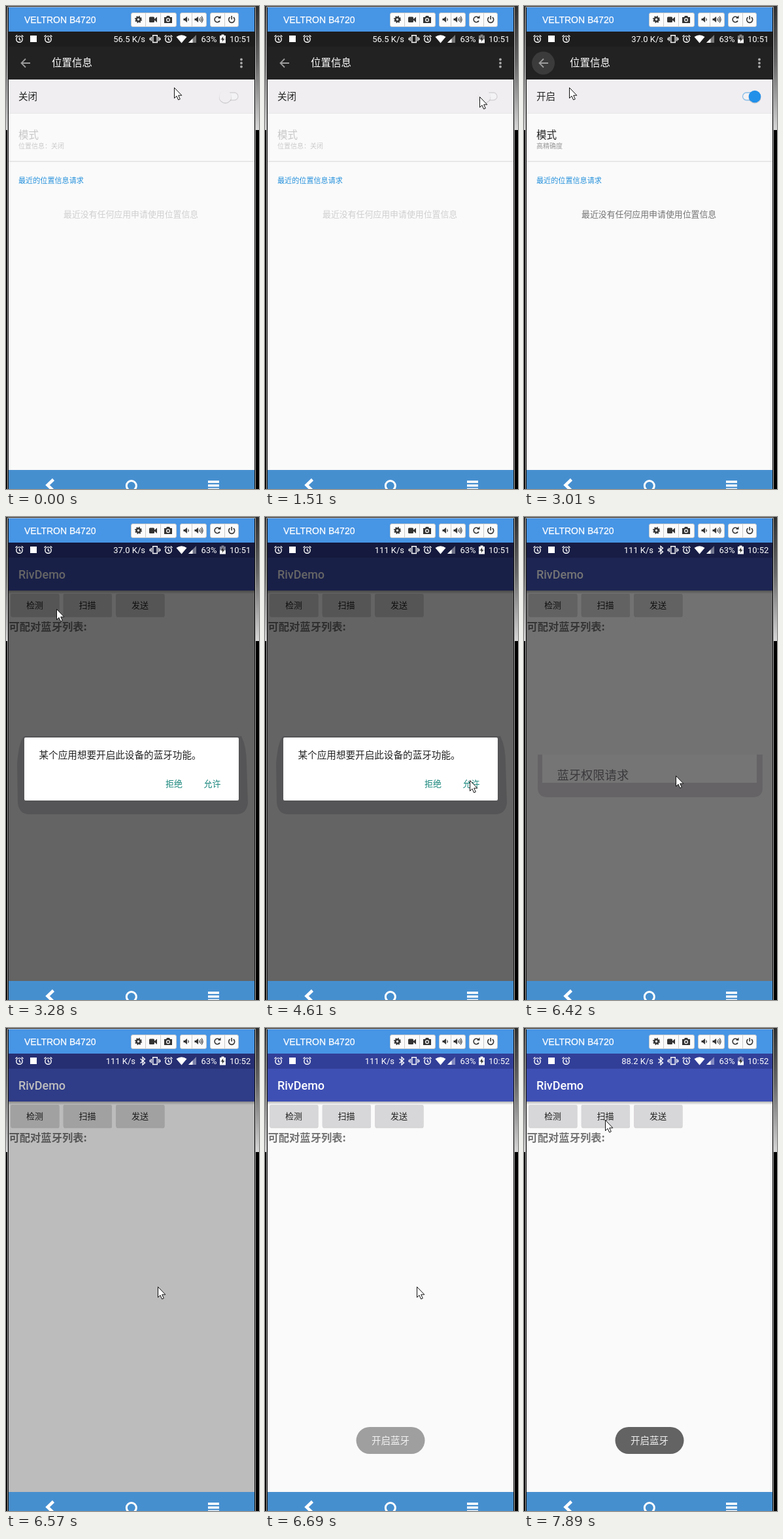
Write an HTML page that moves like this. It is 387x736 px and loops after 8000 ms.

```html
<!DOCTYPE html>
<html lang="zh-CN">
<head>
<meta charset="utf-8">
<title>Phone mirror</title>
<style>
html, body { margin: 0; width: 100%; height: 100%; overflow: hidden; background: #000; }
svg { display: block; width: 387px; height: 736px; font-family: Roboto, "Noto Sans CJK SC", "Noto Sans CJK", sans-serif; }
.cjk { font-family: "Noto Sans CJK SC", "Noto Sans CJK", sans-serif; }
.line { fill: none; stroke: #fff; }
.ink { fill: #333; }
.inkline { fill: none; stroke: #333; stroke-width: 1.6; }
</style>
</head>
<body>
<svg viewBox="0 0 387 736">
  <defs>
    <linearGradient id="wall" x2="0" y2="1">
      <stop offset="0" stop-color="#2c2c2c"/><stop offset=".45" stop-color="#666"/><stop offset="1" stop-color="#d6d6d6"/>
    </linearGradient>
    <linearGradient id="drop" x2="0" y2="1">
      <stop offset="0" stop-opacity=".28"/><stop offset="1" stop-opacity="0"/>
    </linearGradient>
    <g id="alarm" class="line" stroke-width="1.4">
      <circle r="4.7" cy=".6"/><path d="M0-2V1L2 2.3M-6-3.2L-3.3-5.6M6-3.2L3.3-5.6"/>
    </g>
    <g id="key">
      <rect x=".5" y="118" width="74" height="34.5" rx="2" fill="#000" opacity=".16"/>
      <rect y="117" width="74.5" height="34" rx="2" fill="#d7d6d8"/>
    </g>
  </defs>

  <rect width="387" height="736"/>
  <rect width="387" height="189" fill="url(#wall)"/>
  <path d="M2.5 736V1.5H381.5V736" class="line" style="stroke:#b8b8b8"/>
  <rect x="3" y="2" width="378" height="734"/>

  <g id="header">
    <rect x="4" y="2" width="376" height="37" fill="#4795e5"/>
    <text x="28" y="26" font-size="14" fill="#fff" font-family="Liberation Sans, Arial, sans-serif" stroke="#fff" stroke-width=".25">VELTRON B4720</text>
    <g fill="#fbfbfb" stroke="#ccc">
      <rect x="191.5" y="10.5" width="69" height="21" rx="2.5"/>
      <rect x="266.5" y="10.5" width="40" height="21" rx="2.5"/>
      <rect x="312.5" y="10.5" width="43" height="21" rx="2.5"/>
      <path d="M213.500 11V31M236.500 11V31M284.500 11V31M334.500 11V31"/>
    </g>
    <g class="inkline">
      <circle cx="202.500" cy="20.500" r="3" stroke-width="2.600"/>
      <circle cx="202.500" cy="20.500" r="4.700" stroke-dasharray="1.9 1.79"/>
      <circle cx="248" cy="21.300" r="2.600" style="stroke:#fff;stroke-width:1"/>
      <path d="M278.500 18.500Q280 20.500 278.500 22.500M295.500 18.500Q297 20.500 295.500 22.500M297.500 17Q300 20.500 297.500 24M299 15.500Q303 20.500 299 25.500" stroke-width="1.100"/>
      <path d="M326.700 18A4.200 4.200 0 1 0 327 22.500M342.600 17.200A4.500 4.500 0 1 0 347.800 17.200M345.200 15V20.500"/>
    </g>
    <g class="ink">
      <rect x="219" y="16.500" width="8" height="8.500" rx="1.500"/><path d="M227 20L231 16.500V25L227 21.500Z"/>
      <path fill-rule="evenodd" d="M242 17H245L246 15H250L251 17H254V26H242ZM248 18.300A3 3 0 1 0 248 24.300A3 3 0 1 0 248 18.300"/>
      <circle cx="248" cy="21.300" r="1.700"/>
      <path d="M271.500 19H273.500L277 16V25L273.500 22H271.500ZM288.500 19H290.500L294 16V25L290.500 22H288.500ZM328.500 14.500V19H324Z"/>
    </g>
  </g>

  <g id="settings">
    <rect x="4" y="39" width="376" height="23" fill="#1d1d1e"/>
    <rect x="4" y="62" width="376" height="50" fill="#222223"/>
    <circle id="ripple" cx="29.500" cy="87" r="17.500" fill="#3b3b3c"/>
    <path d="M37 87H24M30 80.500L23.500 87L30 93.500" class="line" style="stroke:#9c9c9c" stroke-width="1.800"/>
    <text class="cjk" x="70" y="92" font-size="15.500" fill="#fff">位置信息</text>
    <g fill="#aaa"><circle cx="360" cy="81.500" r="1.900"/><circle cx="360" cy="87" r="1.900"/><circle cx="360" cy="92.500" r="1.900"/></g>
    <rect x="4" y="112" width="376" height="595" fill="#fafafa"/>
    <rect x="4" y="112" width="376" height="52" fill="#f0eef1"/>
    <rect x="4" y="163" width="376" height="1" fill="#e8e6e9"/>
    <rect x="4" y="236" width="376" height="1.500" fill="#e2e2e2"/>
    <g class="cjk">
      <text id="power" x="19" y="143" font-size="14.500" fill="#222"></text>
      <text id="mode" x="19" y="201.500" font-size="15.500">模式</text>
      <text id="detail" x="19" y="217" font-size="10"></text>
      <text x="19" y="270" font-size="11.100" fill="#2490dc">最近的位置信息请求</text>
      <text id="empty" x="88" y="321.500" font-size="12.900">最近没有任何应用申请使用位置信息</text>
    </g>
    <rect id="track" y="132" width="26" height="11.500" rx="5.750" fill="#f3f2f4" stroke-width="1.300"/>
    <g id="thumb"><circle cy="139" r="9.700" opacity=".14"/><circle id="knob" cy="138" r="9.300"/></g>
  </g>

  <g id="app">
    <rect x="4" y="39" width="376" height="23" fill="#323f98"/>
    <rect x="4" y="62" width="376" height="50" fill="#3f50b4"/>
    <text x="19" y="93.500" font-size="18" font-weight="500" fill="#fff">RivDemo</text>
    <rect x="4" y="112" width="376" height="595" fill="#fafafa"/>
    <rect x="4" y="112" width="376" height="5" fill="url(#drop)"/>
    <use href="#key" x="7"/><use href="#key" x="87.500"/><use href="#key" x="168"/>
    <g class="cjk" font-size="13" font-weight="500" fill="#222">
      <text x="31" y="139">检测</text><text x="111.500" y="139">扫描</text><text x="192" y="139">发送</text>
      <text x="4.500" y="173" font-size="16.300" font-weight="700" fill="#737373">可配对蓝牙列表:</text>
    </g>
    <rect id="dim" x="4" y="39" width="376" height="668"/>

    <g id="ask">
      <path d="M28 334H360Q368 350 368 375L370 436Q368 453 352 453H34Q20 452 18 436L17 375Q20 340 28 334" fill="#555557"/>
      <rect x="28" y="336" width="328" height="96" rx="2" fill="#fff"/>
      <g class="cjk" font-size="13" fill="#16857a">
        <text x="50.500" y="368" font-size="14.600" fill="#222">某个应用想要开启此设备的蓝牙功能。</text>
        <text x="244" y="410.500">拒绝</text><text x="302.500" y="410.500">允许</text>
      </g>
    </g>
    <g id="opening">
      <path d="M22 356H364Q368 362 368 370V416Q366 432 352 432H34Q20 432 18 416V370Q18 362 22 356" fill="#555"/>
      <path d="M28 402H358V408Q356 423 342 423H44Q30 423 30 408" fill="#434343"/>
      <rect x="28" y="358" width="328" height="52" rx="2" fill="#fff"/>
      <text class="cjk" x="50.500" y="389.500" font-size="14.600" fill="#222">正在打开蓝牙...</text>
    </g>
    <g id="request">
      <path fill-rule="evenodd" d="M21 362H365V414Q364 427 350 427H36Q22 427 21 414ZM28 362V405H356V362Z" fill="#656366"/>
      <rect id="sheet" x="28" y="362" width="328" height="43" fill="#fff"/>
      <text class="cjk" x="50.500" y="399.500" font-size="18.300" fill="#3b393c">蓝牙权限请求</text>
    </g>
    <g id="toast">
      <rect x="139.500" y="608" width="105" height="41" rx="20.500" fill="#636363"/>
      <text class="cjk" x="163" y="634" font-size="14.500" fill="#eee">开启蓝牙</text>
    </g>
  </g>

  <g id="status" fill="#fff" font-size="13">
    <use href="#alarm" x="20.500" y="50"/><rect x="37" y="45" width="10" height="10"/><use href="#alarm" x="64.500" y="50"/>
    <text id="speed" y="55" text-anchor="end"></text>
    <path id="bluetooth" class="line" stroke-width="1.300" d="M205.500 47L212.500 53L209 56V44.500L212.500 47.500L205.500 53.500"/>
    <path class="line" stroke-width="1.400" d="M224.700 44.700H231.300V55.500H224.700ZM222.300 47V53.500M233.700 47V53.500M220.300 48.500V52M235.700 48.500V52"/>
    <use href="#alarm" x="248.500" y="50"/>
    <path d="M260.500 47Q268.500 41.500 276.500 47L268.500 56.500Z"/>
    <path d="M279 56H291V44Z" opacity=".4"/><path d="M279 56H285.500V49.500Z"/>
    <text x="298.500" y="55">63%</text>
    <g id="battery"><path id="charge" d="M327 45H329.500V43.500H333.500V45H336V50.500H327Z"/><path d="M327 50.500H336V56.500H327Z"/></g>
    <path d="M332.300 46L329 51.200H331.200L330.700 55L334 49.700H331.900Z" fill="#222"/>
    <text id="clock" x="342" y="55"></text>
  </g>

  <rect x="4" y="707" width="376" height="29" fill="#468fcf"/>
  <path class="line" stroke-width="4.500" d="M72.500 721.500L63.500 730L72.500 738.500"/>
  <circle class="line" cx="191.800" cy="731" r="7.500" stroke-width="3"/>
  <path class="line" stroke-width="3.400" d="M309 725H326M309 730.700H326M309 736.400H326"/>
  <path id="cursor" d="M.5.500V16.500L4 13.200L6.600 19L9.300 17.900L6.700 12.200H11.800Z" fill="#fff" stroke="#111"/>
</svg>
<script>
const LOOP = 8000;
// Bursts of refreshes: first, last, count. The picture holds in between.
const bursts = [
  [0, 0, 1], [120, 700, 5], [970, 1930, 8], [2070, 3010, 8], [3130, 3280, 2], [3440, 4040, 5],
  [4190, 5150, 8], [5300, 5760, 4], [6040, 6180, 2], [6420, 6690, 3], [6840, 6990, 2], [7140, 7890, 7]
];
const pointer = [
  [0, 257, 124], [700, 185, 160], [970, 190, 158], [1380, 328, 138], [2070, 326, 140], [2600, 34, 84],
  [2750, 32, 84], [3010, 69, 124], [3130, 75, 136], [3280, 77, 140], [3440, 82, 150], [4040, 285, 380],
  [4470, 314, 400], [4880, 310, 402], [5300, 233, 396], [5450, 232, 394], [6690, 232, 394],
  [6990, 170, 215], [7140, 140, 193], [7400, 32, 146], [7890, 124, 140]
];
const speeds = [[0, "56.5"], [1500, "37.0"], [4600, "111"], [7500, "88.2"]];
const charging = [[0, 1], [410, 0], [2330, 1], [2740, 0], [4600, 1], [5100, 0], [5600, 1], [7500, 0]];
const dimming = [[0, 0], [3280, .6], [6420, .54], [6550, .25], [6690, 0]];

const $ = id => document.getElementById(id);
const set = (id, attrs) => Object.entries(attrs).forEach(([k, v]) => $(id).setAttribute(k, v));
const show = (id, on) => { $(id).style.display = on ? "" : "none"; };
const write = (id, text) => { if ($(id).textContent !== text) $(id).textContent = text; };
const latest = (list, t) => list.filter(e => e[0] <= t).pop();
const ramp = (t, a, b) => Math.min(1, Math.max(0, (t - a) / (b - a)));

function snap(t) {
  const [a, b, n] = latest(bursts, t);
  if (n < 2) return a;
  const step = (b - a) / (n - 1);
  return a + Math.min(n - 1, Math.floor((t - a) / step + .01)) * step;
}

function pointAt(t) {
  const i = pointer.indexOf(latest(pointer, t));
  const [ta, xa, ya] = pointer[i];
  const [tb, xb, yb] = pointer[i + 1] || [LOOP, xa, ya];
  const k = ramp(t, ta, tb);
  return [xa + (xb - xa) * k, ya + (yb - ya) * k];
}

function draw(time) {
  const t = snap(time) + .5;
  const inApp = t >= 3130, on = t >= 1600, linked = t >= 6040;
  show("settings", !inApp);
  show("app", inApp);

  const slide = ramp(t, 1380, 1655);
  set("thumb", { transform: `translate(${335.5 + 17.5 * slide} 0)` });
  set("knob", { fill: slide > .4 ? "#2290e9" : "#f0eef0" });
  set("track", { x: 329 + 5.5 * slide, stroke: slide > .4 ? "#8abfe9" : "#d4d2d5" });
  write("power", on ? "开启" : "关闭");
  write("detail", on ? "高精确度" : "位置信息：关闭");
  set("mode", { fill: on ? "#222" : "#c8c8c8" });
  set("detail", { fill: on ? "#999" : "#cbcbcb" });
  set("empty", { fill: on ? "#737373" : "#cfcfcf" });
  set("ripple", { opacity: ramp(t, 2600, 2870) });

  set("dim", { opacity: latest(dimming, t)[1] });
  show("ask", t >= 3280 && t < 4740);
  show("opening", t >= 4740 && t < 6040);
  show("request", linked && t < 6550);
  set("sheet", { opacity: t < 6420 ? 1 : .02 });
  set("toast", { opacity: t < 6690 ? 0 : t < 6840 ? .6 : 1 });

  write("speed", latest(speeds, t)[1] + " K/s");
  set("speed", { x: linked ? 198 : 213 });
  show("bluetooth", linked);
  set("charge", { opacity: latest(charging, t)[1] ? 1 : .45 });
  write("clock", t < 4880 ? "10:51" : "10:52");
  set("cursor", { transform: `translate(${pointAt(t).map(Math.round).join(" ")})` });
}

const start = performance.now();
function tick() {
  draw((performance.now() - start) % LOOP);
  requestAnimationFrame(tick);
}
tick();
</script>
</body>
</html>
```
